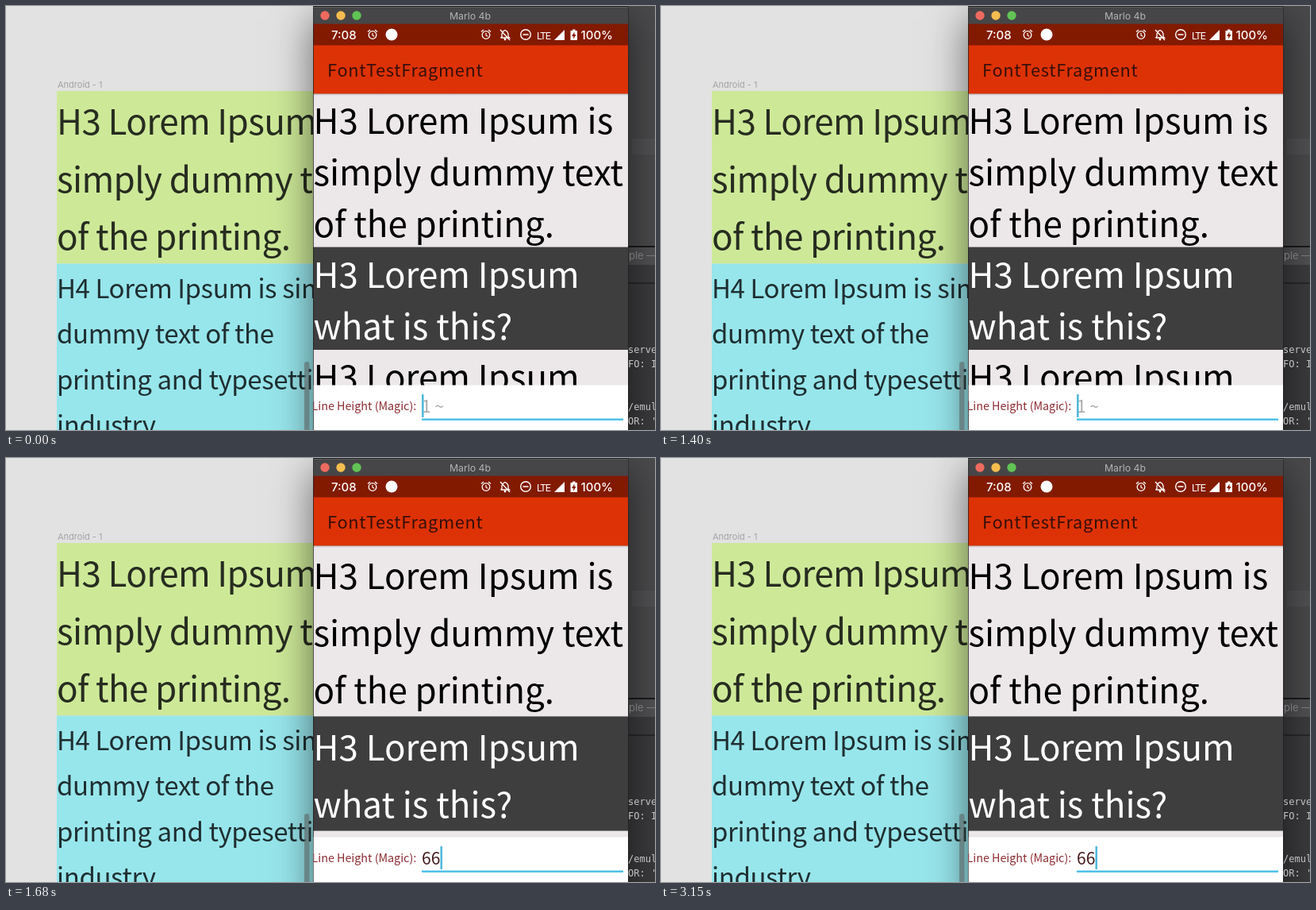
Recreate the animation shown at these times as an HTML page with a canvas. Size 818x534 px, loop 3220 ms.

```html
<!DOCTYPE html>
<html lang="en">
<head>
<meta charset="utf-8">
<style>
  html, body { margin: 0; width: 100%; height: 100%; overflow: hidden; background: #e2e2e2; }
  canvas { display: block; }
</style>
</head>
<body>
<canvas id="stage" width="818" height="534"></canvas>
<script>
const ctx = document.getElementById('stage').getContext('2d');
const LOOP = 3220, TYPE_FIRST = 1610, TYPE_SECOND = 1680;
const LEFT = 387.5, WIDTH = 396.5;
const BODY = '"Noto Sans CJK JP", "Noto Sans CJK KR", "Noto Sans CJK SC", "Noto Sans CJK", "Noto Sans", sans-serif';
const UI = 'Inter, Roboto, sans-serif';
const MONO = '"DejaVu Sans Mono", "Noto Sans Mono", monospace';

function rect(x, y, w, h, color) {
  ctx.fillStyle = color;
  ctx.fillRect(x, y, w, h);
}

function disc(x, y, r, color) {
  ctx.fillStyle = color;
  ctx.beginPath();
  ctx.arc(x, y, r, 0, 7);
  ctx.fill();
}

function ring(x, y, r, width = 1.3) {
  ctx.lineWidth = width;
  ctx.beginPath();
  ctx.arc(x, y, r, 0, 7);
  ctx.stroke();
}

function line(width, ...points) {
  ctx.lineWidth = width;
  ctx.beginPath();
  points.forEach(([x, y]) => ctx.lineTo(x, y));
  ctx.stroke();
}

function shape(color, ...points) {
  ctx.fillStyle = color;
  ctx.beginPath();
  points.forEach(([x, y]) => ctx.lineTo(x, y));
  ctx.fill();
}

function text(str, x, y, size, color, family = BODY, { spacing = 0, weight = 400, align = 'left' } = {}) {
  ctx.font = `${weight} ${size}px ${family}`;
  ctx.letterSpacing = spacing + 'px';
  ctx.textAlign = align;
  ctx.fillStyle = color;
  ctx.fillText(str, x, y);
}

// Lines of a fixed height; each baseline sits a little below the line's centre.
function paragraph(lines, x, top, lineHeight, size, color, spacing = 0) {
  lines.forEach((str, i) =>
    text(str, x, top + lineHeight * (i + 0.5) + size * 0.436, size, color, BODY, { spacing }));
}

function designBoard() {
  rect(0, 0, 818, 534, '#e2e2e2');
  text('Android - 1', 65, 103, 11, '#a2a2a2', UI);
  rect(64, 107, 330, 217.5, '#cde998');
  rect(64, 324.5, 330, 210, '#97e6ec');
  paragraph(['H3 Lorem Ipsum', 'simply dummy t', 'of the printing.'],
    64, 107, 72.5, 44, '#272c20', -0.62);
  paragraph(['H4 Lorem Ipsum is sim', 'dummy text of the', 'printing and typesetti', 'industry.'],
    64, 324.5, 57.5, 33, '#1f2e30', -0.4);
}

function desktop() {
  rect(780, 0, 38, 303, '#4a4a4c');
  rect(789, 167, 29, 20, '#515153');
  rect(780, 302, 38, 2, '#1a1a1b');
  rect(780, 304, 38, 22, '#515154');
  rect(780, 326, 38, 23, '#3c3c3f');
  rect(780, 349, 38, 185, '#3b3b3e');
  rect(780, 348.5, 38, 1, '#151516');
}

function terminalText() {
  text('ple —', 785, 319, 13, '#77777a', UI);
  const rows = [['serve', 437], ['FO: I', 455], ['/emul', 509], ["OR: '", 527]];
  rows.forEach(([str, y]) => text(str, 784, y, 12, '#c4c4c6', MONO));
}

function alarm(x, y) {
  ring(x, y + 0.5, 4.8);
  line(1.2, [x, y - 2], [x, y + 1], [x + 2.2, y + 2.2]);
  line(1.3, [x - 6, y - 3.5], [x - 3, y - 6]);
  line(1.3, [x + 6, y - 3.5], [x + 3, y - 6]);
}

function mutedBell(x, y) {
  line(1.3, [x - 5.5, y + 4], [x - 4, y + 2.5], [x - 4, y - 1], [x - 2.5, y - 4], [x, y - 5.5],
    [x + 2.5, y - 4], [x + 4, y - 1], [x + 4, y + 2.5], [x + 5.5, y + 4], [x - 5.5, y + 4]);
  disc(x, y + 6, 1.4, '#fff');
  line(1.4, [x - 6, y - 6], [x + 6, y + 7]);
}

function statusBar() {
  rect(LEFT, 22.5, WIDTH, 27, '#821a00');
  ctx.strokeStyle = '#fff';
  text('7:08', 410, 42, 15, '#fff', UI, { weight: 500 });
  alarm(462, 36);
  disc(486, 36, 7.5, '#fff');
  alarm(605, 36);
  mutedBell(629, 36);
  ring(655, 36, 6.3, 1.4);
  line(1.6, [651.5, 36], [658.5, 36]);
  text('LTE', 669, 41.5, 12.5, '#fff', 'Roboto, sans-serif', { spacing: -0.9 });
  shape('#fff', [691, 43], [704, 43], [704, 30]);
  rect(711.5, 31, 8.5, 12, '#fff');
  rect(714, 29.5, 3.5, 2, '#fff');
  shape('#821a00', [716.5, 32.5], [713, 38], [715.2, 38], [715.2, 41.5], [718.6, 36], [716.5, 36]);
  text('100%', 724.5, 42, 15, '#fff', UI, { weight: 500 });
}

function windowFrame() {
  ctx.save();
  ctx.shadowColor = 'rgba(0,0,0,.55)';
  ctx.shadowBlur = 48;
  ctx.shadowOffsetY = 16;
  rect(387, 0, 397.5, 560, '#1c1c1c');
  ctx.restore();
  ctx.fillStyle = 'rgba(95,108,108,.65)';
  ctx.beginPath();
  ctx.roundRect(376, 448, 6.5, 100, 3.2);
  ctx.fill();
  rect(LEFT, 1, WIDTH, 22, '#464648');
  rect(LEFT, 1, WIDTH, 1, '#606062');
  ['#ee6a5f', '#f5bd4f', '#61c454'].forEach((color, i) => disc(402 + 20 * i, 12, 5.7, color));
  text('Marlo 4b', 585, 17, 12.3, '#b3b3b5', UI, { align: 'center' });
}

function appBar() {
  rect(LEFT, 49, WIDTH, 61.5, '#dd3205');
  text('FontTestFragment', 405, 89, 21.8, '#351009', BODY, { spacing: 0.7 });
  const shade = ctx.createLinearGradient(0, 110, 0, 113);
  shade.addColorStop(0, 'rgba(0,0,0,.22)');
  shade.addColorStop(1, 'rgba(0,0,0,0)');
  rect(LEFT, 110, WIDTH, 3, shade);
}

const blocks = [
  { lines: ['H3 Lorem Ipsum is', 'simply dummy text', 'of the printing.'], back: '#ece7e9', ink: '#000' },
  { lines: ['H3 Lorem Ipsum', 'what is this?'], back: '#3e3e3e', ink: '#fff' },
  { lines: ['H3 Lorem Ipsum'], back: '#ece7e9', ink: '#000' }
];

function preview(lineHeight) {
  let y = 110;
  for (const { lines, back, ink } of blocks) {
    const height = lines.length * lineHeight;
    rect(LEFT, y, WIDTH, height, back);
    // Collapsed paragraphs show only their last line.
    const hidden = lineHeight < 20 ? lines.length - 1 : 0;
    paragraph(lines.slice(hidden), LEFT, y + hidden * lineHeight, lineHeight, 43.9, ink);
    y += height;
  }
  y = Math.min(y, 477.5);
  rect(LEFT, y, WIDTH, 534 - y, '#fff');
}

function inputRow(value, cursor) {
  text('Line Height (Magic):', 385.5, 509, 14.3, '#8c2b30');
  text(value || '1 ~', 524, 512, 21, value ? '#43191a' : '#a9a9a9');
  rect(524, 519.5, 254, 2.5, '#4fc1e9');
  if (cursor) rect(524 + value.length * 11.7, 489, 2.6, 29, '#53b9db');
}

function draw(t) {
  const value = t < TYPE_FIRST ? '' : t < TYPE_SECOND ? '6' : '66';
  const lineHeight = { '': 64.6, '6': 6.4, '66': 71.9 }[value];
  const cursorOff = (t >= 600 && t < 1100) || (t >= 2180 && t < 2680);

  designBoard();
  desktop();
  windowFrame();
  terminalText();
  ctx.save();
  ctx.beginPath();
  ctx.rect(LEFT, 22, WIDTH, 512);
  ctx.clip();
  preview(lineHeight);
  inputRow(value, !cursorOff);
  appBar();
  statusBar();
  ctx.restore();
}

function tick() {
  draw(performance.now() % LOOP);
  requestAnimationFrame(tick);
}
tick();
</script>
</body>
</html>
```
